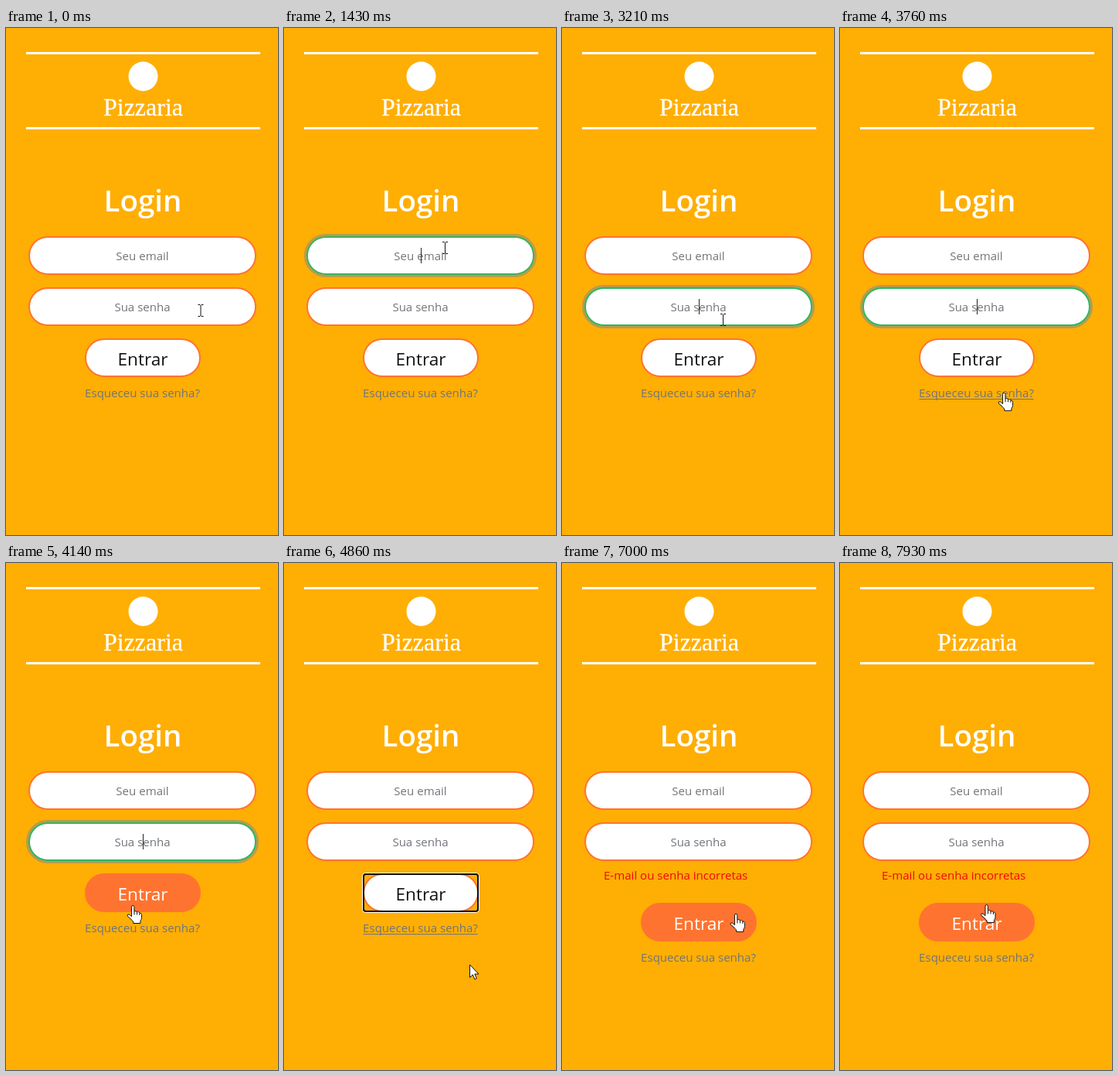
Animation, 352 px wide and 655 px high, one loop 8000 ms. Source, as an HTML page:

```html
<!DOCTYPE html>
<html lang="pt-BR">
<head>
<meta charset="utf-8">
<title>Login</title>
<style>
  html, body { margin: 0; width: 100%; height: 100%; overflow: hidden; background: #ffae04; }
  svg { display: block; width: 352px; height: 655px; }
  text { font-family: "Open Sans", "Noto Sans", sans-serif; font-size: 15.05px; text-anchor: middle; }
  .brand { font-family: "Liberation Serif", "Times New Roman", serif; font-size: 32px; fill: #fff; stroke: #fff; stroke-width: .3; }
  .title { font-size: 38.5px; font-weight: 600; fill: #fff; }
  .hint { fill: #71757a; }
  .label { font-size: 22.6px; }
  .link { fill: #6c757d; }
  .error { fill: #f00808; text-anchor: start; }
  .box { fill: #fff; stroke: #ff7330; stroke-width: 2; }
  .glow { fill: none; stroke: #0d6efd; stroke-width: 3; }
  .caret { fill: #222; }
  .line { fill: none; stroke: #111; }
  .shape { fill: #fff; stroke: #111; stroke-linejoin: round; }
</style>
</head>
<body>
<svg viewBox="0 0 352 655">
  <rect width="352" height="655" fill="#ffae04"/>
  <rect x="26" y="31" width="303" height="3" fill="#fff"/>
  <rect x="26" y="128" width="303" height="3" fill="#fff"/>
  <circle cx="177.5" cy="62.5" r="19" fill="#fff"/>
  <text class="brand" x="177.5" y="113">Pizzaria</text>
  <text class="title" x="177" y="237">Login</text>

  <g id="email">
    <rect class="glow" x="27.5" y="267.5" width="298" height="53" rx="26.5"/>
    <rect class="box" x="30" y="270" width="293" height="48" rx="24"/>
    <text class="hint" x="176.5" y="300">Seu email</text>
    <rect class="caret" x="177" y="284" width="1" height="20"/>
  </g>
  <g id="senha">
    <rect class="glow" x="27.5" y="333.5" width="298" height="53" rx="26.5"/>
    <rect class="box" x="30" y="336" width="293" height="48" rx="24"/>
    <text class="hint" x="176.5" y="366">Sua senha</text>
    <rect class="caret" x="177" y="350" width="1" height="20"/>
  </g>
  <text id="error" class="error" x="54" y="409">E-mail ou senha incorretas</text>

  <g id="actions">
    <rect id="button" class="box" x="103" y="402" width="148" height="48" rx="24"/>
    <g id="ring" fill="none">
      <rect x="101.5" y="400.5" width="151" height="51" rx="4" stroke="#fff"/>
      <rect x="103" y="402" width="148" height="48" rx="3" stroke="#101010" stroke-width="2"/>
    </g>
    <text id="label" class="label" x="177" y="435.5">Entrar</text>
    <text class="link" x="176.5" y="477">Esqueceu sua senha?</text>
    <rect id="underline" x="102.5" y="479" width="148" height="1" fill="#6c757d"/>
  </g>

  <g id="cursor">
    <path id="beam" class="line" d="M-3.5-7.5H-1L0-6.5 1-7.5H3.5M0-6.5V6.5M-3.5 7.5H-1L0 6.5 1 7.5H3.5"/>
    <path id="arrow" class="shape" d="M0 0V16.5L3.8 12.9 6.3 18.8 8.8 17.7 6.3 12H11.5Z"/>
    <g id="hand">
      <path class="shape" d="M-2 2Q-2 0-.3 0T1.4 2V8Q2.2 7 3.4 7.2 4.8 7.4 5 8.8 6 7.9 7.1 8.3 8.3 8.7 8.4 10 9.4 9.4 10.2 10 11 10.6 11 12V16Q11 18 9.4 20V23H.2V20.6Q-2 19-3.6 16.6L-6.8 14.2Q-8 12.4-6.8 11.6-5.2 11-3.6 12.8L-2 14.2Z"/>
      <path class="line" d="M1.5 8V12M5 8.8V12M8.4 10V12.5"/>
    </g>
  </g>
</svg>
<script>
  const LOOP = 8000, FADE = 150, BLINK = 530;
  const EMAIL_CLICK = 1290, SENHA_CLICK = 2450, CARET_RESET = 2690, SUBMIT = 4400, RELOAD = 4920;
  const el = id => document.getElementById(id);
  const clamp = v => Math.max(0, Math.min(1, v));
  const show = (node, on) => node.setAttribute("visibility", on ? "visible" : "hidden");

  // Pointer stops: time, x, y
  const path = [
    [0, 252, 365], [70, 252, 365], [230, 162, 95], [350, 158, 111], [580, 158, 111],
    [900, 219, 240], [1110, 208.5, 284], [1740, 208.5, 284], [2200, 219, 366],
    [2600, 219, 366], [3000, 208.5, 377], [3210, 208.5, 377], [3370, 238, 426],
    [3520, 262, 465], [3750, 215, 472], [3980, 164.5, 442.5], [4450, 164.5, 442.5],
    [4770, 215, 474], [4860, 240.5, 519], [5310, 240.5, 519], [5450, 343, 450],
    [5620, 300, 395], [5750, 247, 379], [5880, 200, 440], [6000, 232, 476.5],
    [6150, 232, 476.5], [6380, 280, 430], [6620, 287, 395], [6770, 287, 395],
    [6880, 245, 367], [7010, 225, 460], [7150, 235, 558], [7320, 235, 558],
    [7480, 340, 636], [7680, 290, 530], [7800, 215, 465], [7930, 190, 441.5],
    [LOOP, 190, 441.5]
  ];

  const still = (a, b) => !a || !b || (a[1] === b[1] && a[2] === b[2]);

  function slope(i, k) {
    const a = path[i - 1], b = path[i], c = path[i + 1];
    return still(a, b) || still(b, c) ? 0 : (c[k] - a[k]) / (c[0] - a[0]);
  }

  function pointer(t) {
    let i = 0;
    while (i < path.length - 2 && path[i + 1][0] <= t) i++;
    const a = path[i], b = path[i + 1], d = b[0] - a[0], u = clamp((t - a[0]) / d);
    const ease = u * u * (3 - 2 * u);
    return [1, 2].map(k => a[k] + (b[k] - a[k]) * ease
      + d * u * (1 - u) * ((1 - u) * slope(i, k) - u * slope(i + 1, k)));
  }

  const within = ([x, y], left, top, right, bottom) =>
    x >= left && x <= right && y >= top && y <= bottom;

  const blend = (a, b, u) => `rgb(${a.map((v, i) => Math.round(v + (b[i] - v) * u))})`;

  function drawField(id, t, start, end, caretStart) {
    const field = el(id);
    const focus = clamp((t - start) / FADE) * (1 - clamp((t - end) / FADE));
    field.querySelector(".glow").setAttribute("opacity", .3 * focus);
    field.querySelector(".box").style.stroke = blend([255, 115, 48], [43, 182, 100], focus);
    const lit = Math.floor((t - caretStart) / BLINK) % 2 === 0;
    show(field.querySelector(".caret"), t >= start && t < end && lit);
  }

  function draw(t) {
    const failed = t >= RELOAD, drop = failed ? 38 : 0;
    const at = pointer(t);
    const onLink = p => within(p, 102, 462 + drop, 251, 484 + drop);
    const onButton = within(at, 102, 401 + drop, 252, 451 + drop);
    const onText = within(at, 29, 269, 324, 319) || within(at, 29, 335, 324, 385)
      || within(at, 126, 88, 229, 118) || within(at, 127, 200, 227, 250)
      || (failed && within(at, 54, 394, 241, 414));

    drawField("email", t, EMAIL_CLICK, SENHA_CLICK, EMAIL_CLICK);
    drawField("senha", t, SENHA_CLICK, SUBMIT, t < CARET_RESET ? SENHA_CLICK : CARET_RESET);

    show(el("error"), failed);
    el("actions").setAttribute("transform", `translate(0 ${drop})`);
    el("button").style.fill = onButton ? "#ff7330" : "#fff";
    el("label").style.fill = onButton ? "#fff" : "#111";
    show(el("ring"), t >= SUBMIT && !failed);
    show(el("underline"), onLink(at) || onLink(pointer(Math.max(0, t - 95))));

    const kind = onButton || onLink(at) ? "hand" : onText ? "beam" : "arrow";
    for (const id of ["hand", "beam", "arrow"]) show(el(id), id === kind);
    el("cursor").setAttribute("transform", `translate(${at})`);
  }

  const begin = performance.now();
  function tick() {
    draw((performance.now() - begin) % LOOP);
    requestAnimationFrame(tick);
  }
  tick();
</script>
</body>
</html>
```
